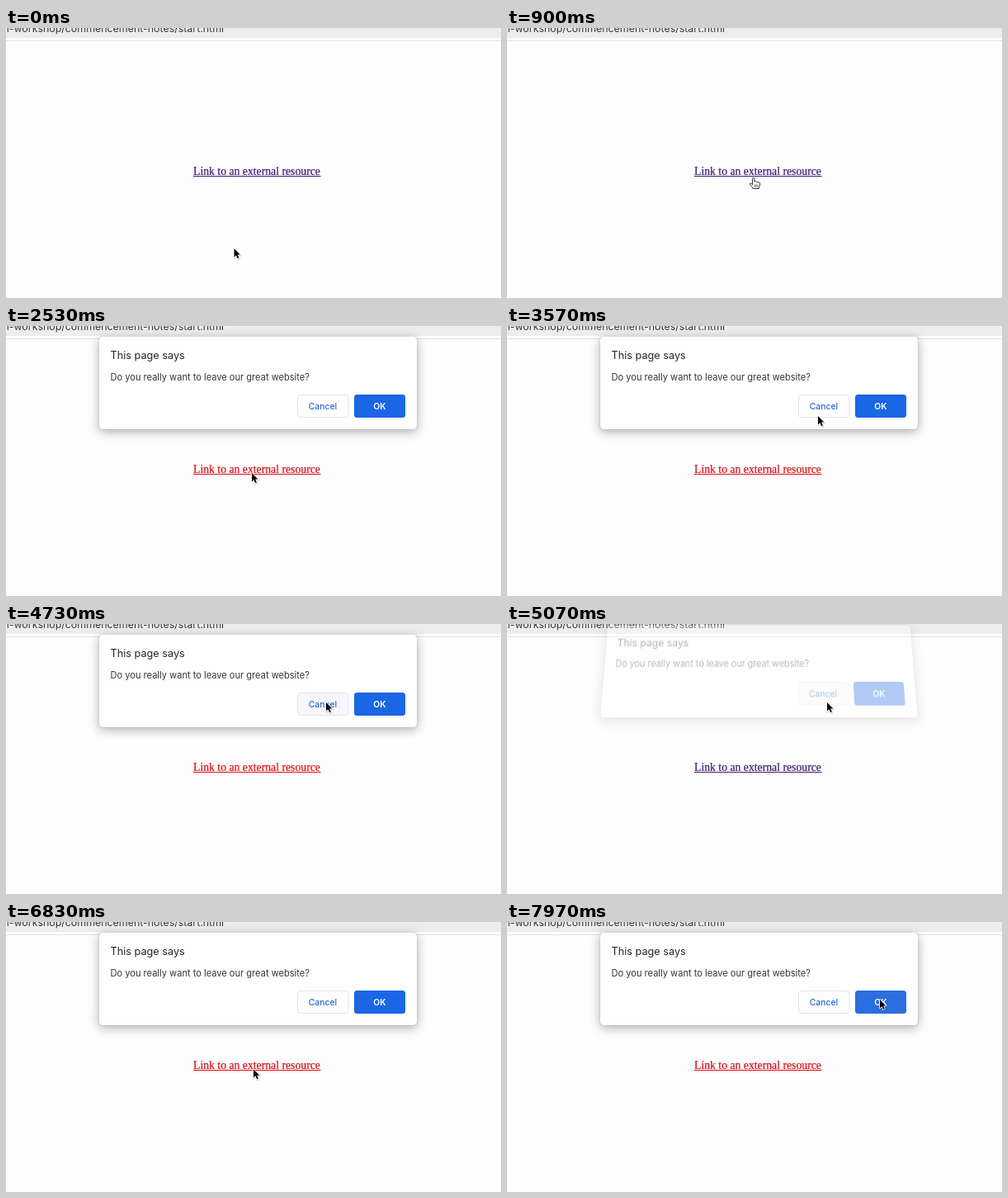
Write an HTML page that moves like this. It is 600 px wide and 327 px high and loops after 8000 ms.

```html
<!DOCTYPE html>
<html lang="en">
<head>
<meta charset="utf-8">
<title>Confirm before leaving</title>
<style>
  html, body { margin: 0; width: 100%; height: 100%; overflow: hidden; background: #fdfdfd; }
  #stage { position: relative; width: 600px; height: 327px; overflow: hidden; background: #fdfdfd; }
  svg { position: absolute; left: 0; top: 0; overflow: visible; }
  .ui { font-family: Inter, Roboto, sans-serif; }
  #link { font: 13.73px "Liberation Serif", "Times New Roman", serif; }
  #link text { stroke: currentColor; stroke-width: .2; }
  #dialog {
    position: absolute; left: 113px; top: 13px; width: 384.5px; height: 112px;
    border-radius: 4px; background: #fefefe; transform-origin: 50% 100%;
    box-shadow: 0 0 1px rgba(0,0,0,.5), 0 3px 13px rgba(0,0,0,.32);
  }
</style>
</head>
<body>
<div id="stage">
  <svg width="600" height="327">
    <rect width="600" height="12" fill="#ecedf1"/>
    <rect y="15" width="600" height="1" fill="#e2e2e5"/>
    <text class="ui" x="264" y="4.5" font-size="12.4" text-anchor="end" fill="#35363a">ravon-workshop/commencement-notes/start.html</text>
    <g id="link" fill="currentColor">
      <text x="227" y="177.7">Link to an external resource</text>
      <rect x="227" y="179" width="154.5" height="1"/>
    </g>
  </svg>

  <div id="dialog">
    <svg class="ui" width="384.5" height="112">
      <text x="13.5" y="27.3" font-size="12.7" fill="#26272b">This page says</text>
      <text x="13.5" y="52.5" font-size="11.08" fill="#36373b">Do you really want to leave our great website?</text>
      <rect id="cancel" x="240.5" y="70.5" width="61.5" height="27" rx="3.5" stroke="#e2e4e8"/>
      <text x="271" y="87.7" font-size="10.4" font-weight="500" text-anchor="middle" fill="#2468d4">Cancel</text>
      <rect id="ok" x="309" y="70" width="62" height="28" rx="3.5"/>
      <text x="340" y="87.7" font-size="10.4" font-weight="600" text-anchor="middle" fill="#fff">OK</text>
    </svg>
  </div>

  <svg width="600" height="327">
    <g id="arrow" stroke-linejoin="round">
      <path d="M0 0V10.4L2.4 8.2L4.1 12.1L5.9 11.3L4.2 7.5H7.4Z" transform="translate(.5 1.2)" fill="none" stroke="#000" stroke-opacity=".14" stroke-width="2.2"/>
      <path d="M0 0V10.4L2.4 8.2L4.1 12.1L5.9 11.3L4.2 7.5H7.4Z" fill="#080808" stroke="#fff" stroke-width="1.5" paint-order="stroke"/>
    </g>
    <g id="hand" stroke="#252528" stroke-width=".95" stroke-linejoin="round" stroke-linecap="round">
      <path fill="#fff" d="M-1.3 8V1A1.2 1.2 0 0 1 1.1 1V4.6C1.6 3.9 3.4 4.2 3.6 5C4.3 4.4 5.6 4.8 5.8 5.6C7 5.2 7.8 5.8 7.8 7C7.8 10 6.6 10.5 6.4 13H-.8C-1.4 11 -4 8.6 -4.4 7.4C-4.6 6.2 -3 6 -1.3 8Z"/>
      <path fill="none" stroke-width=".7" d="M1.5 8.5V11M3.3 8.5V11M5.1 8.5V11"/>
    </g>
  </svg>
</div>

<script>
const LOOP = 8000;
const $ = id => document.getElementById(id);
const [link, dialog, cancel, ok, arrow, hand] =
  ["link", "dialog", "cancel", "ok", "arrow", "hand"].map($);

const clamp = v => Math.min(1, Math.max(0, v));
const smooth = v => v * v * (3 - 2 * v);
const within = (t, a, b) => t >= a && t < b;

// time, x, y, sideways bend of the way there
const path = [
  [30, 276.5, 267, 0],
  [830, 299, 182, 0],
  [1150, 298, 178, 0],
  [2560, 298, 178, 0],
  [3930, 388, 95, 7.6],
  [5470, 388, 95, 0],
  [6220, 300, 178.5, 0],
  [7200, 300, 178, 0],
  [7850, 452, 94, 0]
];

function pointer(t) {
  const i = path.findIndex(p => p[0] > t);
  if (i === 0) return path[0].slice(1, 3);
  if (i < 0) return path[path.length - 1].slice(1, 3);
  const [t0, x0, y0] = path[i - 1], [t1, x1, y1, bend] = path[i];
  const s = smooth((t - t0) / (t1 - t0));
  return [x0 + (x1 - x0) * s + bend * 4 * s * (1 - s), y0 + (y1 - y0) * s];
}

const OPEN_1 = 1715, CLOSE = 4980, OPEN_2 = 6610, SLIDE = 220;

// What is left of an eased slide that began at the given time: 1 down to 0.
const remaining = (t, from) => (1 - clamp((t - from) / SLIDE)) ** 2;

// 0 = fully shown, 1 = hidden
function hiddenAmount(t) {
  if (t < CLOSE) return remaining(t, OPEN_1);
  if (t < OPEN_2) return 1 - remaining(t, CLOSE);
  return remaining(t, OPEN_2);
}

// Lift the sheet and narrow its top while keeping its height.
function poseDialog(u) {
  const k = 0.0007 * u, lift = -17.8 * u;
  const sy = 1 + 112 * k;
  const m = [1, 0, 0, 0, 0, sy - lift * k, 0, -k, 0, 0, 1, 0, 0, lift, 0, 1];
  dialog.style.visibility = u < 1 ? "visible" : "hidden";
  dialog.style.opacity = 1 - u;
  dialog.style.transform = u > 0 ? `matrix3d(${m.map(v => v.toFixed(7))})` : "none";
}

function draw(t) {
  const [x, y] = pointer(t);
  const open = within(t, OPEN_1, CLOSE) || t >= OPEN_2;
  const active = within(t, 1650, CLOSE) || t >= 6572;
  const overLink = !open && x > 227 && x < 382 && y > 166 && y < 183;

  link.style.color = active ? "#d90d12" : "#401872";
  poseDialog(hiddenAmount(t));
  cancel.setAttribute("fill", x > 353 && x < 415 && y < 106 ? "#f6f7fa" : "#fefefe");
  ok.setAttribute("fill", x > 422 && y < 110 ? "#2c6edf" : "#1a66e5");

  const place = `translate(${x.toFixed(2)} ${y.toFixed(2)})`;
  arrow.setAttribute("transform", place);
  hand.setAttribute("transform", place);
  arrow.setAttribute("visibility", overLink ? "hidden" : "visible");
  hand.setAttribute("visibility", overLink ? "visible" : "hidden");
}

const start = performance.now();
function tick() {
  draw((performance.now() - start) % LOOP);
  requestAnimationFrame(tick);
}
draw(0);
requestAnimationFrame(tick);
</script>
</body>
</html>
```
